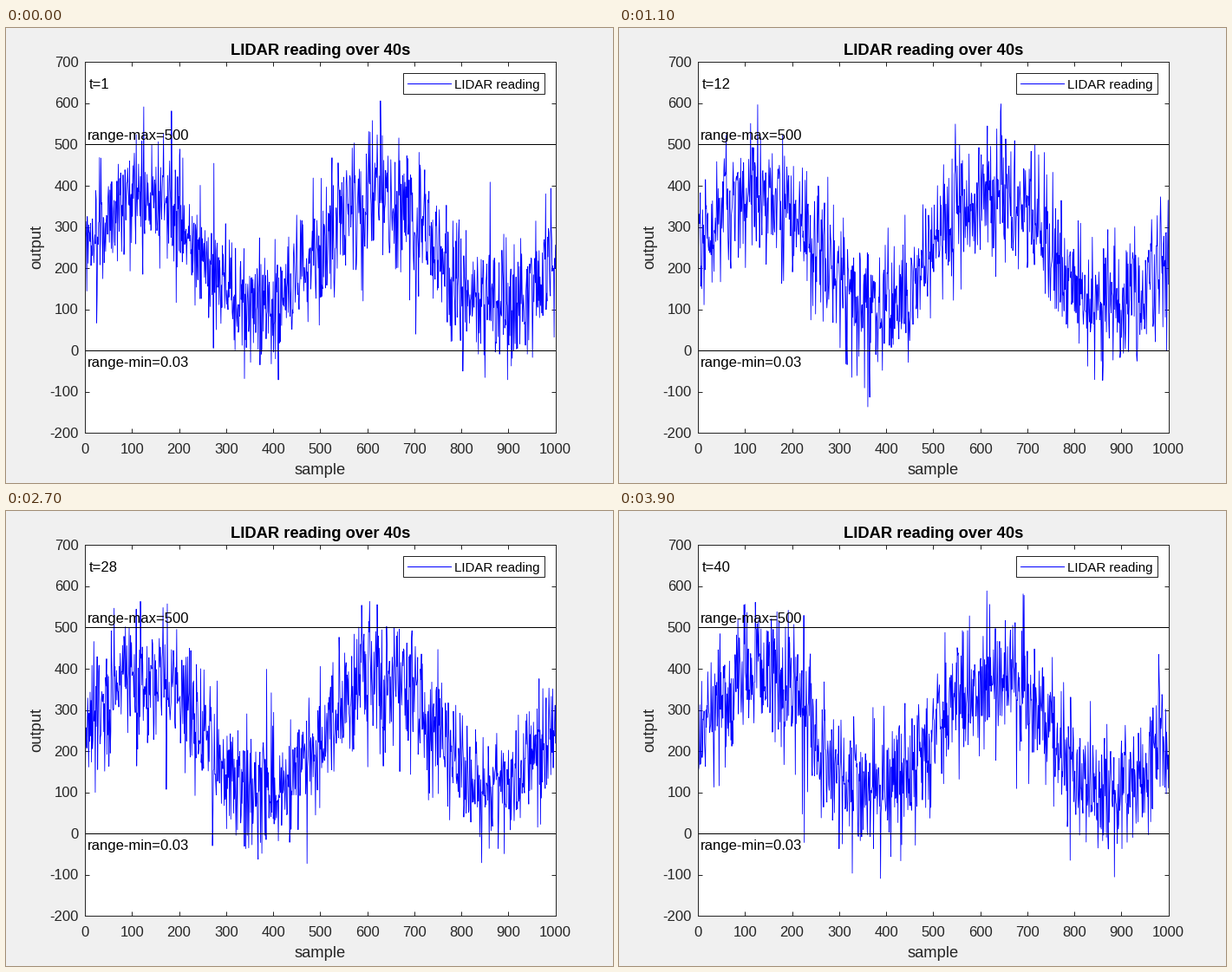
A matplotlib script for the animation above (4 s loop, 700 by 525 pixels).

```python
import numpy as np
import matplotlib.pyplot as plt
from matplotlib.animation import FuncAnimation
from matplotlib.lines import Line2D
from matplotlib.patches import Rectangle
from matplotlib.transforms import Affine2D

W, H, DPI = 700, 525, 100
FRAMES, INTERVAL = 40, 100
LEFT, RIGHT, TOP, BOTTOM = 91, 633.75, 39.375, 467.25
Y_MIN, Y_MAX = -200, 700
PT = 72 / DPI
AXIS, BLUE = "#262626", "#0000ff"
SMALL, NORMAL, LARGE = 15, 16.67, 18.33
MEAN, SWING, NOISE = 243, 142, 81

plt.rcParams["font.family"] = "Liberation Sans"
plt.rcParams["path.simplify"] = False

fig = plt.figure(figsize=(W / DPI, H / DPI), dpi=DPI, facecolor="#f0f0f0")
px = Affine2D().scale(1 / W, -1 / H).translate(0, 1) + fig.transFigure
ax = fig.add_axes([LEFT / W, 1 - BOTTOM / H,
                   (RIGHT - LEFT) / W, (BOTTOM - TOP) / H])


def put(x, y, text, size=NORMAL, color="black", ha="left", **kw):
    """Write text with its baseline at a pixel position."""
    return fig.text(x, y, text, transform=px, fontsize=size * PT, color=color,
                    ha=ha, va="baseline", **kw)


def setup_axes():
    ax.set(xlim=(0, 1000), ylim=(Y_MIN, Y_MAX), facecolor="white")
    ax.set_xticks(range(0, 1001, 100))
    ax.set_yticks(range(Y_MIN, Y_MAX + 1, 100))
    ax.tick_params(direction="in", top=True, right=True, length=5.4 * PT,
                   width=PT, color=AXIS, labelbottom=False, labelleft=False)
    for spine in ax.spines.values():
        spine.set(linewidth=PT, color=AXIS)
    for v in range(0, 1001, 100):
        x = LEFT + v / 1000 * (RIGHT - LEFT)
        put(x, 491, str(v), color=AXIS, ha="center")
    for v in range(Y_MIN, Y_MAX + 1, 100):
        y = BOTTOM - (v - Y_MIN) / (Y_MAX - Y_MIN) * (BOTTOM - TOP)
        put(83.5, round(y + 5.5), str(v), color=AXIS, ha="right")
    for level in (500, 0.03):
        ax.axhline(level, color="black", lw=PT, zorder=2.2)


def setup_text():
    put(362.7, 31, "LIDAR reading over 40s", LARGE, ha="center", weight="bold")
    put(362.5, 515, "sample", LARGE, AXIS, ha="center")
    put(40, 253, "output", LARGE, AXIS, ha="center",
        rotation=90, rotation_mode="anchor")
    put(94, 129, "range-max=500")
    put(94, 391, "range-min=0.03")


def setup_legend():
    fig.add_artist(Rectangle((458, 52), 163, 24, transform=px, fc="white",
                             ec=AXIS, lw=PT))
    fig.add_artist(Line2D([463, 513], [64, 64], transform=px, color=BLUE,
                          lw=PT))
    put(517, 70, "LIDAR reading", SMALL)


def readings(t):
    """A slow sine wave buried in fresh noise for each second."""
    noise = np.random.default_rng(t).normal(0, NOISE, samples.size)
    return MEAN + SWING * np.sin(samples / 80) + noise


def update(frame):
    t = frame + 1
    curve.set_ydata(readings(t))
    clock.set_text(f"t={t}")
    return curve, clock


samples = np.arange(1, 1001)
setup_axes()
setup_text()
setup_legend()
curve, = ax.plot(samples, readings(1), color=BLUE, lw=0.6, zorder=2)
clock = put(96, 70, "t=1")

anim = FuncAnimation(fig, update, frames=FRAMES, interval=INTERVAL,
                     repeat=True, repeat_delay=0, blit=False)
plt.show()
```
